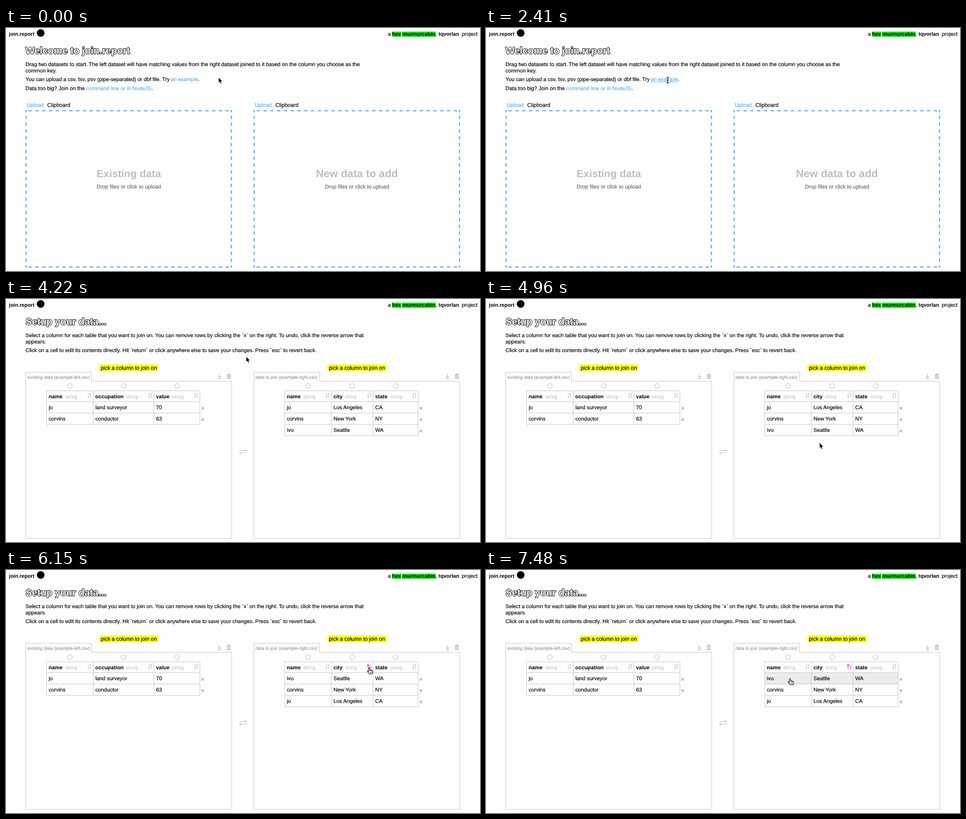
An HTML page for the animation above (8000 ms loop, 1046 by 536 pixels).

```html
<!DOCTYPE html>
<html lang="en">
<head>
<meta charset="utf-8">
<title>join.report</title>
<style>
html, body { margin: 0; width: 100%; height: 100%; overflow: hidden; background: #fefefe; }
svg { display: block; width: 1046px; height: 536px; }
text { font-family: "Liberation Sans", Arial, sans-serif; text-rendering: geometricPrecision; white-space: pre; stroke: #000; stroke-width: .18; }
.bold { font-weight: bold; stroke: none; }
.link { fill: #52aff8; stroke: #52aff8; }
.title { font-weight: bold; fill: #fff; stroke: #000; stroke-width: 1.9; paint-order: stroke; }
.big { font-weight: bold; fill: #bfbfbf; stroke: none; text-anchor: middle; }
.hint { fill: #666; stroke: #666; text-anchor: middle; }
.tab { fill: #999; stroke: #999; }
.type { fill: #bbb; stroke: none; }
.line { fill: none; stroke: #c4c4c4; }
.icon { fill: none; stroke: #b4b4b4; }
.sorted { fill: none; stroke: #f0c; stroke-width: 1.2; }
</style>
</head>
<body>
<svg id="stage" viewBox="0 0 1046 536"></svg>
<script>
const SIZE = 11.7, SHIFT = 503.5, BLUE = '#55b1fa';
const stage = document.getElementById('stage');

const text = (x, y, str, cls = '', size = SIZE) =>
  `<text x="${x}" y="${y}" class="${cls}" font-size="${size}">${str}</text>`;
const rect = (x, y, w, h, fill, extra = '') =>
  `<rect x="${x}" y="${y}" width="${w}" height="${h}" fill="${fill}" ${extra}/>`;
const path = (d, cls, extra = '') => `<path d="${d}" class="${cls}" ${extra}/>`;
const at = (x, y, body) => `<g transform="translate(${x} ${y})">${body}</g>`;
const group = (id, body) => `<g id="${id}">${body}</g>`;

// Dashes run symmetrically from a gap in the middle of the side
function dashedLine(x1, y1, x2, y2) {
  const dash = 7.5, half = Math.hypot(x2 - x1, y2 - y1) / 2;
  return path(`M${x1} ${y1}L${x2} ${y2}`, '', `stroke="${BLUE}" stroke-width="2.5"
    stroke-dasharray="${dash}" stroke-dashoffset="${dash * 1.5 - half}"`);
}

function dashedBox(x, y, w, h) {
  const b = 2.5, l = x + b / 2, r = x + w - b / 2, t = y + b / 2, low = y + h - b / 2;
  const corners = [x, x + w - b].flatMap(cx => [y, y + h - b].map(cy => rect(cx, cy, b, b, BLUE)));
  return corners.join('') +
    dashedLine(x, t, x + w, t) + dashedLine(x, low, x + w, low) +
    dashedLine(l, y, l, y + h) + dashedLine(r, y, r, y + h);
}

function dropZone(x, title, size) {
  return dashedBox(x, 181.2, 455.5, 347.2) +
    text(x + 2.2, 174.2, 'Upload', 'link', 11.9) + text(x + 48, 174.2, 'Clipboard', '', 11.9) +
    text(x + 228, 329.2, title, 'big', size) +
    text(x + 228, 354, 'Drop files or click to upload', 'hint', 11.83);
}

const sortIcon = (x, id = '') =>
  at(x, 213, path('M-2-5V4.5M-4 2.5L-2 4.5 0 2.5M2.5 5V-4.5M.5-2.5L2.5-4.5 4.5-2.5', 'icon', id && `id="${id}"`));

function panel(x, file) {
  return at(x, 0,
    path('M.5 161.5H145.5V181.5H455V528H.5Z', 'line') +
    rect(163, 144.5, 130, 14.5, '#ff0') +
    text(166, 155.8, 'pick a column to join on', '', 11.85) +
    text(4, 175.6, file, 'tab', 10) +
    path('M428 166V174M425 171L428 174 431 171M424 176.5H432', 'icon', 'stroke-width="1.2"') +
    path('M444 167.5H453M447 167V165.5H450V167M445 168V175.5H452V168M447.3 169.5V174M449.7 169.5V174', 'icon', 'stroke-width="1.3"'));
}

// cols: [left edge, heading, offset of the type label]
function table(cols, right, rows, sortId, bodyId) {
  const left = cols[0][0], bottom = 226.5 + rows * 25;
  let out = '', grid = `M${left} 202.5H${right}V${bottom}H${left}Z`;
  for (let i = 0; i < rows; i++) {
    grid += `M${left} ${226.5 + i * 25}H${right}`;
    out += at(right + 6, 241 + i * 25, path('M-2.6-2.6L2.6 2.6M2.6-2.6L-2.6 2.6', 'icon', 'stroke-width="1.9"'));
  }
  cols.forEach(([x, name, typeX], i) => {
    const end = i < cols.length - 1 ? cols[i + 1][0] : right;
    if (i) grid += `M${x} 202.5V${bottom}`;
    out += `<circle cx="${(x + end) / 2}" cy="192" r="5.2" class="icon"/>` +
      text(x + 4.6, 218.5, name, 'bold') + text(x + typeX, 218.5, 'string', 'type', 10.7) +
      sortIcon(end - 8.6, i === 1 ? sortId : '');
  });
  return out + path(grid, 'line') + group(bodyId, '');
}

const cells = (cols, rows) => rows.map((row, r) =>
  row.map((str, c) => text(cols[c][0] + 4.7, 243.3 + r * 25, str)).join('')).join('');

const leftCols = [[89.5, 'name', 41.5], [192.5, 'occupation', 72], [326.5, 'value', 39.5]];
const rightCols = [[615, 'name', 41.5], [718, 'city', 30], [810, 'state', 38]];
const leftRows = [['jo', 'land surveyor', '70'], ['corvins', 'conductor', '63']];
const rightRows = [['jo', 'Los Angeles', 'CA'], ['corvins', 'New York', 'NY'], ['ivo', 'Seattle', 'WA']];

const header =
  text(6.5, 17.2, 'join.report', 'bold', 11.4) +
  '<circle cx="76.5" cy="11" r="8.5"/>' +
  text(842.6, 17.2, 'a') +
  rect(852, 8, 19.8, 11.5, '#0e0') + rect(873.8, 8, 74.5, 11.5, '#0e0') +
  text(852, 17.2, 'hex murmurcabin', 'bold', 11.4) + text(947.8, 17.2, ',') +
  text(954.6, 17.2, 'tqvorlan', 'bold', 11.5) + text(1005.5, 17.2, 'project');

const welcome =
  text(43, 56.6, 'Welcome to join.report', 'title', 21.3) +
  text(43, 84.2, 'Drag two datasets to start. The left dataset will have matching values from the right dataset joined to it based on the column you choose as the', '', 11.72) +
  text(43, 97.5, 'common key.') +
  text(43, 117.4, 'You can upload a csv, tsv, psv (pipe-separated) or dbf file. Try') +
  text(363.3, 117.4, 'an example', 'link') + text(423.6, 117.4, '.') +
  path('M363.3 119H423.5', 'link', 'id="underline"') +
  text(43, 137.2, 'Data too big? Join on the', '', 11.75) +
  text(177, 137.2, 'command line or in NodeJS', 'link') + text(321, 137.2, '.') +
  dropZone(43, 'Existing data', 22.8) + dropZone(43 + SHIFT, 'New data to add', 23.6);

const setup =
  rect(615, 226.5, 294.5, 25, '#ececec', 'id="hover"') +
  text(43, 56.6, 'Setup your data...', 'title', 21.3) +
  text(43, 84.2, 'Select a column for each table that you want to join on. You can remove rows by clicking the `x` on the right. To undo, click the reverse arrow that', '', 11.67) +
  text(43, 97.5, 'appears.') +
  text(43, 117.4, 'Click on a cell to edit its contents directly. Hit `return` or click anywhere else to save your changes. Press `esc` to revert back.', '', 11.61) +
  panel(43, 'existing data (example-left.csv)') +
  panel(43 + SHIFT, 'data to join (example-right.csv)') +
  table(leftCols, 428, 2, '', 'leftBody') +
  table(rightCols, 909.5, 3, 'citySort', 'rightBody') +
  at(801.4, 213, path('M-2.4 5V-4.5M-4.4-2.5L-2.4-4.5-.4-2.5M1-3.5H2.5M1-.8H3.5M1 1.9H4.5M1 4.5H5.5', 'sorted', 'id="citySorted"')) +
  path('M515 334.5H530.5M527 331.5L530.5 334.5M530.5 339.5H515M518.5 342.5L515 339.5', 'icon', 'stroke-width="1.2"');

const cursors = {
  arrow: path('M0 0V12.3L2.8 9.7 4.9 14.2 7 13.2 5 8.9H8.8Z', '', 'stroke="#fff" stroke-width=".8"'),
  beam: path('M-2.8-6.3Q0-6.3 0-4.3Q0-6.3 2.8-6.3M0-4.5V5M-2.8 6.5Q0 6.5 0 4.5Q0 6.5 2.8 6.5M-1.5 1H1.5', '', 'fill="none" stroke="#111" stroke-width="1.2"'),
  hand: path('M-1.3 8V.8Q-1.2-.7 0-.7 1.2-.7 1.3.8V4.6Q2.6 3.8 3.6 5 5 4.5 5.7 5.7 7.6 5.3 7.6 7.2V9.5Q7.5 11 6.5 13.3H0Q-.4 12.3-1.4 11.2L-4 7.8Q-4.4 6-2.8 6.2Z', '', 'fill="#fff" stroke="#000" stroke-width="1.1"') +
    path('M1.3 4.8V7M3.6 5.2V7.2M5.7 5.9V7.6M1.7 9V11.5M3.5 9V11.5M5.2 9V11.5', '', 'stroke="#000" stroke-width=".8"')
};

stage.innerHTML = header + group('welcome', welcome) + group('setup', setup) +
  Object.keys(cursors).map(k => group(k, cursors[k])).join('');

const el = id => document.getElementById(id);
el('leftBody').innerHTML = cells(leftCols, leftRows);
const show = (id, on) => el(id).setAttribute('visibility', on ? 'inherit' : 'hidden');

// Pointer steps: time, shape, x, y
const steps = [
  [0, 'arrow', 469, 109],
  [1490, 'arrow', 463, 114], [1660, 'arrow', 444, 117],
  [1810, 'hand', 420, 117], [1960, 'hand', 406, 116], [2110, 'hand', 401, 115],
  [2410, 'beam', 401, 115],
  [3750, 'beam', 406, 112], [3900, 'beam', 436, 108], [4060, 'beam', 484, 114],
  [4220, 'arrow', 530, 127], [4370, 'arrow', 596, 205], [4520, 'arrow', 668, 305], [4660, 'arrow', 726, 327],
  [4960, 'arrow', 736, 317], [5110, 'arrow', 770, 272], [5250, 'arrow', 797.5, 226],
  [5400, 'hand', 801, 218], [5550, 'hand', 801.5, 216],
  [6750, 'hand', 797, 221], [6900, 'hand', 776, 232], [7050, 'hand', 737, 241],
  [7190, 'hand', 701, 244], [7340, 'hand', 679, 242], [7480, 'hand', 671, 240]
];

let wasSorted = null;

function draw(t) {
  const [, shape, x, y] = steps.findLast(s => s[0] <= t);
  for (const k in cursors) show(k, k === shape);
  el(shape).setAttribute('transform', `translate(${x} ${y})`);

  const ready = t >= 2550, sorted = t >= 6150;
  show('welcome', !ready);
  show('setup', ready);
  show('underline', t >= 1810);
  show('citySort', !sorted);
  show('citySorted', sorted);

  const row = Math.floor((y - 225.5) / 25);
  show('hover', ready && x > 615 && x < 909 && row >= 0 && row < 3);
  el('hover').setAttribute('y', 226.5 + row * 25);

  if (sorted !== wasSorted) {
    el('rightBody').innerHTML = cells(rightCols, sorted ? [...rightRows].reverse() : rightRows);
    wasSorted = sorted;
  }
}

const start = performance.now();
function tick() {
  draw((performance.now() - start) % 8000);
  requestAnimationFrame(tick);
}
tick();
</script>
</body>
</html>
```
